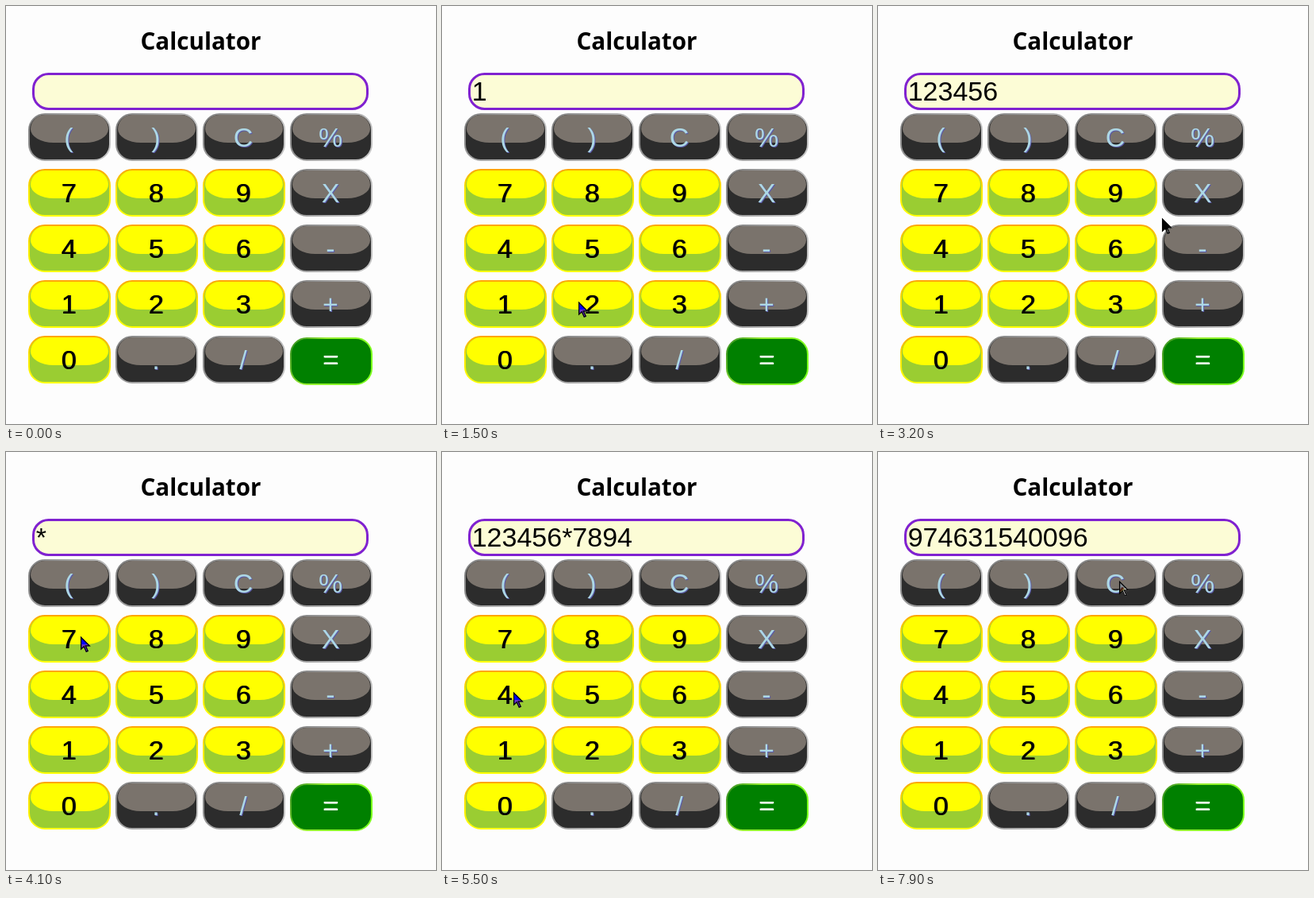
An HTML page that plays this animation: 542x526 px, repeating every 8000 ms.

```html
<!DOCTYPE html>
<html lang="en">
<head>
<meta charset="utf-8">
<title>Calculator</title>
<style>
  html, body { margin: 0; width: 100%; height: 100%; overflow: hidden; background: #fdfdfd; }
  svg { display: block; width: 542px; height: 526px; }
  text { font: 34px "Liberation Sans", Arial, sans-serif; }
  .title { font: bold 29.6px "Open Sans", "Noto Sans", sans-serif; }
  .key text { text-anchor: middle; }
  .digit text { fill: #000; text-shadow: 1px 0 0 #222; }
  .operator text { fill: #add8e6; text-shadow: 1px 1px 0 #5a5aa8; }
  .equals text { fill: #fff; text-shadow: 1px 0 0 #fff; }
  .invert { fill: #fff; mix-blend-mode: difference; }
  .outline { fill: none; stroke: #000; stroke-width: 1.3; }
</style>
</head>
<body>
<svg viewBox="0 0 542 526">
  <defs>
    <linearGradient id="digitEdge" x2="0" y2="1">
      <stop offset="0" stop-color="#ffa500"/><stop offset=".4" stop-color="#ffe600"/>
      <stop offset="1" stop-color="#ffff00"/>
    </linearGradient>
    <linearGradient id="operatorEdge" x2="1" y2=".4">
      <stop offset="0" stop-color="#808080"/><stop offset="1" stop-color="#c4c4c4"/>
    </linearGradient>
    <linearGradient id="equalsEdge" x2="1" y2=".3">
      <stop offset="0" stop-color="#2f8a20"/><stop offset=".4" stop-color="#9aee32"/>
      <stop offset="1" stop-color="#7dff1e"/>
    </linearGradient>
  </defs>
  <rect width="542" height="526" fill="#fdfdfd"/>
  <text class="title" x="245.5" y="55" text-anchor="middle">Calculator</text>
  <rect x="34.5" y="85.5" width="421" height="44" rx="19" fill="#fcfcd6" stroke="#8022d0" stroke-width="3"/>
  <text id="display" x="37.7" y="118.5"></text>
  <g id="keys"></g>
  <g id="cursor">
    <path class="invert" d="M0 0V17L4 13.5L7 20L10 18.7L7.2 12.5H12.5Z"/>
    <path class="outline" d="M.6 1.3V16L4.3 12.8L7.2 19.2L9.2 18.3L6.3 11.9H11.2Z"/>
  </g>
</svg>
<script>
const LOOP = 8000, STEP = 100;
const ENTER = 400, FIRST_PRESS = 1270, BEAT = 322;
const rows = ["()C%", "789X", "456-", "123+", "0./="];
// One character per beat; a space lengthens the move, a repeated "=" rests there.
const presses = "123456 X 789 4566=== C";
const colors = {
  digit: { body: "#9acd32", gloss: "#ffff00" },
  operator: { body: "#2c2c2c", gloss: "#7a736c" },
  equals: { body: "#008000" }
};

const keyAt = label => {
  const row = rows.findIndex(labels => labels.includes(label));
  return { x: 28 + rows[row].indexOf(label) * 110, y: 135 + row * 70 + (label === "=" ? 2 : 0) };
};

function keyMarkup(label) {
  const kind = label === "=" ? "equals" : /\d/.test(label) ? "digit" : "operator";
  const { body, gloss } = colors[kind];
  const { x, y } = keyAt(label);
  const shine = gloss
    ? `<path fill="${gloss}" d="M3 20A18 18 0 0 1 21 2H83A18 18 0 0 1 101 20A29 17 0 0 1 72 37H32A29 17 0 0 1 3 20Z"/>` : "";
  return `<g class="key ${kind}" transform="translate(${x} ${y})">
    <rect x="1" y="1" width="102" height="58" rx="20" fill="${body}" stroke="url(#${kind}Edge)" stroke-width="2"/>
    ${shine}<text x="51" y="${kind === "equals" ? 40 : 42}">${label}</text></g>`;
}

const beatTime = i => Math.min(FIRST_PRESS + i * BEAT, LOOP - STEP);

const stops = [{ t: ENTER, x: 520, y: 510 }];
[...presses].forEach((label, i) => {
  if (label === " ") return;
  const { x, y } = keyAt(label);
  stops.push({ t: beatTime(i), x: x + 56, y: y + 27 });
});

function pointerAt(t) {
  const next = Math.max(1, stops.findIndex(stop => stop.t >= t));
  const a = stops[next - 1], b = stops[next];
  const k = Math.max(0, (t - a.t) / (b.t - a.t));
  const eased = k * k * (3 - 2 * k);
  return [a.x + (b.x - a.x) * eased, a.y + (b.y - a.y) * eased];
}

function displayAt(t) {
  const typed = [...presses].filter((c, i) => c !== " " && beatTime(i) <= t).join("");
  if (typed.endsWith("X")) return "*";
  if (!typed.includes("==")) return typed.replace("X", "*").replace("=", "");
  const [left, right] = typed.split("X").map(part => parseInt(part));
  return left * right;
}

document.getElementById("keys").innerHTML = [...rows.join("")].map(keyMarkup).join("");
const display = document.getElementById("display");
const cursor = document.getElementById("cursor");

function draw() {
  const t = Math.floor(performance.now() % LOOP / STEP) * STEP;
  display.textContent = displayAt(t);
  cursor.setAttribute("visibility", t < ENTER ? "hidden" : "visible");
  cursor.setAttribute("transform", `translate(${pointerAt(t).map(Math.round).join(" ")})`);
  requestAnimationFrame(draw);
}
draw();
</script>
</body>
</html>
```
